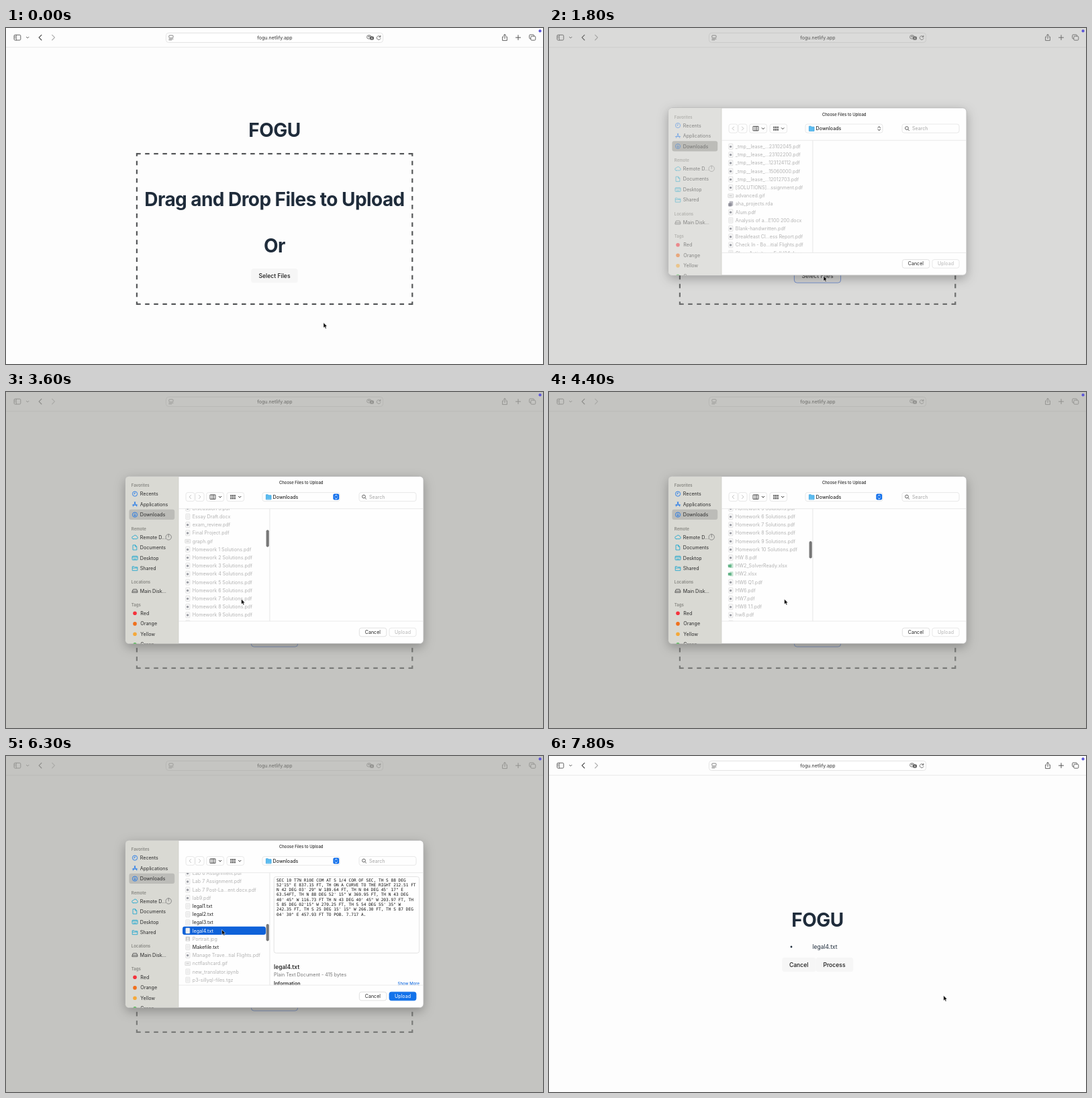
Animation of 800x500 px, one loop 8 s. Source, as an HTML page:

```html
<!DOCTYPE html>
<html lang="en">
<head>
<meta charset="utf-8">
<title>File upload</title>
<style>
html, body { margin: 0; width: 100%; height: 100%; overflow: hidden; background: #fdfdfd; }
svg { display: block; width: 800px; height: 500px; font-family: Inter, "Open Sans", sans-serif; }
.mono { font-family: "DejaVu Sans Mono", monospace; white-space: pre; }
.line { fill: none; stroke-linecap: round; stroke-linejoin: round; }
.butt { stroke-linecap: butt; }
</style>
</head>
<body>
<svg id="stage" viewBox="0 0 800 500"></svg>
<script>
const LOOP = 8000, STEP = 100, ROW = 12.2, FIRST_ROW = 183;
const INK = '#1f2c3b', BLUE = '#0f6fec', CYAN = '#25a9cf';

const text = (x, cy, str, { size = 7.1, fill = '#2b2b2b', weight = 400, anchor = 'start', extra = '' } = {}) =>
  `<text x="${x}" y="${cy + size * 0.36}" font-size="${size}" fill="${fill}" font-weight="${weight}" text-anchor="${anchor}" ${extra}>${str}</text>`;
const rect = (x, y, w, h, r = 0, fill = 'none', stroke = 'none', extra = '') =>
  `<rect x="${x}" y="${y}" width="${w}" height="${h}" rx="${r}" fill="${fill}" stroke="${stroke}" ${extra}/>`;
const path = (d, stroke = '#555', width = 0.9, extra = '') =>
  `<path class="line" d="${d}" stroke="${stroke}" stroke-width="${width}" ${extra}/>`;
const circle = (x, y, r, fill = 'none', stroke = 'none', width = 0.8) =>
  `<circle cx="${x}" cy="${y}" r="${r}" fill="${fill}" stroke="${stroke}" stroke-width="${width}"/>`;
const chevron = (x, y, dx, dy, stroke, width = 0.9) => dx
  ? path(`M${x - dx / 2} ${y - dy}L${x + dx / 2} ${y}L${x - dx / 2} ${y + dy}`, stroke, width)
  : path(`M${x - 1.8} ${y - dy / 2}L${x} ${y + dy / 2}L${x + 1.8} ${y - dy / 2}`, stroke, width);
const heading = (cy, str) =>
  text(400, cy, str, { size: 28, fill: INK, weight: 700, anchor: 'middle', extra: 'letter-spacing="-.56"' });
const centered = { anchor: 'middle' };

function toolbar() {
  return rect(0, 0, 800, 29, 0, '#fdfdfd') + rect(0, 28.4, 800, 0.8, 0, '#e3e3e3')
    + rect(238.4, 7.4, 323.2, 14.2, 4, '#fff', '#dedede', 'stroke-width=".8"')
    + text(400.5, 14.6, 'fogu.netlify.app', { ...centered, fill: '#333' })
    + '<g id="tools">'
    + rect(12, 10.3, 9.8, 7.8, 1.6, 'none', '#555', 'stroke-width=".9"') + path('M15.4 10.4V18M13.2 12.2h.9M13.2 13.7h.9M13.2 15.2h.9', '#555', 0.7)
    + chevron(32.2, 14.2, 0, 1.8, '#555', 0.9)
    + chevron(51, 14.2, -3.8, 3.8, '#444', 1.1) + chevron(70.6, 14.2, 3.8, 3.8, '#aaa', 1.1)
    + rect(242.8, 11, 6.2, 3.8, 0.9, 'none', '#666', 'stroke-width=".8"') + path('M242.8 16.4h6.2M242.8 18h4', '#666', 0.7)
    + rect(537.8, 10.8, 6, 5.2, 2, '#fff', '#555', 'stroke-width=".8"') + rect(542, 12.4, 6, 5.4, 1.8, '#555')
    + path('M539.5 12.5h2.6M540.8 11.8v2.6', '#555', 0.6) + path('M544 16.4l1-2.4l1 2.4', '#fff', 0.6)
    + path('M557.8 13.2A2.9 2.9 0 1 0 558 15.6M557.9 11.2V13.4H555.8', '#555', 0.8)
    + path('M741 13.1H739.6V18.6H746.4V13.1H745M743 15.7V9.6M741 11.4L743 9.5L745 11.4', '#555', 0.9)
    + path('M763 10.7V17.7M759.5 14.2H766.5', '#555', 1)
    + rect(779.6, 10, 7, 6, 1.4, 'none', '#555', 'stroke-width=".9"') + rect(781.8, 12.2, 7, 6, 1.4, '#fdfdfd', '#555', 'stroke-width=".9"')
    + '</g>';
}

// Solid corners, with dashes balanced around the middle of each side.
function dropZone(left, top, right, bottom) {
  const w = 2.18, dash = 3 * w, corner = 2 * w, h = w / 2;
  const midX = (left + right) / 2, midY = (top + bottom) / 2;
  let sides = '', corners = '';
  for (const y of [top + h, bottom - h])
    for (const x of [left + h, right - h]) {
      const sx = Math.sign(midX - x), sy = Math.sign(midY - y);
      sides += `M${midX} ${y}H${x + sx * (corner - h)}M${x} ${midY}V${y + sy * (corner - h)}`;
      corners += `M${x + sx * (corner - h)} ${y}H${x - sx * h}M${x} ${y + sy * (corner - h)}V${y - sy * h}`;
    }
  const color = '#555759';
  return `<path class="butt" fill="none" d="${sides}" stroke="${color}" stroke-width="${w}" stroke-dasharray="${dash}" stroke-dashoffset="${dash * 1.5}"/>`
    + `<path class="butt" fill="none" d="${corners}" stroke="${color}" stroke-width="${w}"/>`;
}

function uploadPage() {
  return '<g id="uploadPage">' + heading(152, 'FOGU') + dropZone(193.8, 186, 606.4, 412)
    + heading(255, 'Drag and Drop Files to Upload') + heading(323.8, 'Or')
    + rect(365.2, 358, 69.6, 21.2, 4, '#f6f6f6')
    + rect(365.4, 358.2, 69.2, 20.9, 4, 'none', '#3f74e6', 'id="ring" stroke-width=".8"')
    + text(400, 368.8, 'Select Files', { ...centered, size: 8.6, weight: 500, fill: '#1a1a1a' }) + '</g>';
}

function resultPage() {
  const label = { ...centered, size: 8.6, weight: 500, fill: '#1a1a1a' };
  return '<g id="resultPage">' + heading(243.6, 'FOGU') + circle(361, 284, 1.4, INK)
    + text(411, 284, 'legal4.txt', { ...centered, size: 8.5, fill: INK })
    + rect(347.3, 299.8, 50.4, 21.4, 4, '#f6f6f6') + rect(397.6, 299.8, 55.6, 21.4, 4, '#f6f6f6')
    + text(372.2, 310.6, 'Cancel', label) + text(425, 310.6, 'Process', label) + '</g>';
}

const glyphs = {
  clock: (y, c) => circle(192, y, 3.6, 'none', c) + path(`M192 ${y - 2}V${y}H190.6`, c, 0.8),
  apps: (y, c) => path(`M189.4 ${y + 3}L192.6 ${y - 3.4}M191.4 ${y - 3.4}L194.8 ${y + 3}M188.3 ${y + 1}H195.7`, c),
  down: (y, c) => circle(192, y, 3.6, 'none', c) + path(`M192 ${y - 1.8}V${y + 1.8}M190.5 ${y + .4}L192 ${y + 1.9}L193.5 ${y + .4}`, c, 0.8),
  cloud: (y, c) => path(`M189.4 ${y + 2.6}H194.8A1.9 1.9 0 0 0 195 ${y - 1}A2.8 2.8 0 0 0 189.8 ${y - 1.2}A1.9 1.9 0 0 0 189.4 ${y + 2.6}Z`, c),
  page: (y, c) => path(`M189.4 ${y - 3.6}H192.6L194.8 ${y - 1.4}V${y + 3.6}H189.4ZM192.5 ${y - 3.4}V${y - 1.3}H194.6`, c),
  desk: (y, c) => rect(188, y - 2.8, 8, 5.8, 1, 'none', c, 'stroke-width=".9"') + path(`M188.4 ${y - 1.2}H195.6M190 ${y + 1.6}H194`, c),
  folder: (y, c) => path(`M188.2 ${y + 2.8}V${y - 2.8}H191L192 ${y - 1.8}H195.8V${y + 2.8}ZM188.4 ${y - .5}H195.6`, c),
  disk: (y, c) => path(`M188.2 ${y + .4}L189.4 ${y - 2.4}H194.6L195.8 ${y + .4}V${y + 2.5}H188.2ZM188.4 ${y + .4}H195.6`, c),
  dot: (y, c) => circle(192, y, 2.8, c)
};

function sidebar() {
  const sections = [['Favorites', 139], ['Remote', 203.5], ['Locations', 283.2], ['Tags', 316.7]];
  const places = [
    ['Recents', 151.6, 'clock', BLUE], ['Applications', 167.1, 'apps', BLUE], ['Downloads', 182.6, 'down', BLUE],
    ['Remote D...', 216, 'cloud', CYAN], ['Documents', 231.4, 'page', CYAN], ['Desktop', 247, 'desk', CYAN],
    ['Shared', 262.5, 'folder', CYAN], ['Main Disk...', 296, 'disk', '#555'], ['Red', 329.3, 'dot', '#f5323c'],
    ['Orange', 344.9, 'dot', '#f0701c'], ['Yellow', 360.3, 'dot', '#f5a93a'], ['Green', 375.9, 'dot', '#45b649']
  ];
  return '<g id="side">' + sections.map(([s, y]) => text(186.8, y, s, { size: 6, weight: 600, fill: '#868681' })).join('')
    + places.map(([s, y, g, c]) => glyphs[g](y, c) + text(g === 'dot' ? 200.3 : 199.8, y, s)).join('')
    + circle(242.2, 215.9, 4.2, 'none', '#777', 0.8) + path('M242.2 211.7V215.9', '#777', 0.8) + '</g>';
}

const files = [
  '_tmp__lease_...23102045.pdf', '_tmp__lease_...23102200.pdf', '_tmp__lease_...123124112.pdf',
  '_tmp__lease_...15060000.pdf', '_tmp__lease_...12012703.pdf', '[SOLUTIONS]...ssignment.pdf',
  'advanced.gif', 'aha_projects.rda', 'Alum.pdf', 'Analysis of a...E100 200.docx', 'Blank-handwritten.pdf',
  'Breakfeast Cl...ess Report.pdf', 'Check In - Bo...itial Flights.pdf', "Class Activity...s Fall '24.docx",
  'classifier.cpp', 'data_cleaning.ipynb', 'Discussion 3.pdf', 'Essay Draft.docx', 'exam_review.pdf',
  'Final Project.pdf', 'graph.gif',
  ...[1, 2, 3, 4, 5, 6, 7, 8, 9, 10].map(n => `Homework ${n} Solutions.pdf`),
  'HW 8.pdf', 'HW2_SolverReady.xlsx', 'HW2.xlsx', 'HW6 Q1.pdf', 'HW6.pdf', 'HW7.pdf', 'HW8 1.1.pdf', 'hw8.pdf',
  'Lab 5 Assignment.pdf', 'Lab 6 Assignment.pdf', 'Lab 7 Assignment.pdf', 'Lab 7 Post-La...ent.docx.pdf', 'lab9.pdf',
  'legal1.txt', 'legal2.txt', 'legal3.txt', 'legal4.txt', 'Portrait.jpg', 'Makefile.txt',
  'Manage Trave...tial Flights.pdf', 'nctflashcard.gif', 'new_translator.ipynb', 'p3-sillyql-files.tgz', 'p4-starter-files.tgz'
];
const picked = files.indexOf('legal4.txt');
const rowY = i => FIRST_ROW + ROW * i;

function fileIcon(kind, y) {
  const sheet = rect(267.8, y - 4, 6, 8, 0.7, '#fafafa', '#d2d2d2', 'stroke-width=".6"');
  if (kind === 'pdf') return sheet + circle(270.6, y + 0.2, 1.7, '#9a9ca3');
  if (kind === 'gif') return rect(266.8, y - 2.6, 8, 5.4, 0.5, '#f4f4f4', '#c8c8c8', 'stroke-width=".6"') + rect(268.6, y - 0.6, 4, 1.2, 0, '#c8c8c8');
  if (kind === 'jpg') return rect(267.6, y - 3.4, 6.4, 6.8, 0.6, '#c9c9c9') + circle(270.8, y - 0.8, 1.3, '#eee') + rect(268.8, y + 1, 4, 2, 1, '#eee');
  if (kind === 'rda') return rect(268.6, y - 4, 5.6, 7, 1, '#b9b9c0') + rect(267.2, y - 1.4, 5, 5, 1, '#8f8f9a');
  if (kind === 'xlsx') return rect(269, y - 3.6, 5.4, 7, 0.6, '#c4e4d1') + rect(266.8, y - 2, 5, 4.2, 0.6, '#63b488');
  return sheet + path(`M269.2 ${y - 1.8}h3.2M269.2 ${y}h3.2M269.2 ${y + 1.8}h3.2`, '#d0d0d0', 0.5);
}

function fileList() {
  return '<g clip-path="url(#body)"><g id="rows">'
    + rect(263, rowY(picked) - 6.2, 124, 12.3, 3, BLUE, 'none', 'id="pickFill"')
    + files.map((name, i) => {
      const kind = name.split('.').pop();
      return fileIcon(kind, rowY(i)) + text(277.8, rowY(i), name,
        { fill: kind === 'txt' ? '#1c1c1c' : '#b2b2b2', extra: i === picked ? 'id="pickText"' : '' });
    }).join('') + '</g>' + rect(387.6, 177, 4.2, 25.4, 2.1, '#777', 'none', 'id="thumb"') + '</g>';
}

function preview() {
  const lines = [
    'SEC 10 T7N R10E COM AT S 1/4 COR OF SEC, TH S 88 DEG',
    '52\'15" E 837.15 FT, TH ON A CURVE TO THE RIGHT 212.51 FT',
    'N 42 DEG 03\' 29" W 189.64 FT, TH N 04 DEG 45\' 17" E',
    '63.54FT, TH N 88 DEG 52\' 15" W 369.95 FT, TH N 43 DEG',
    '40\' 45" W 116.73 FT TH N 43 DEG 40\' 45" W 203.97 FT, TH',
    'S 85 DEG 02\'15" W 270.25 FT, TH S 54 DEG 55\' 35" W',
    '242.35 FT, TH S 25 DEG 15\' 15" W 266.30 FT, TH S 87 DEG',
    '04\' 30" E 457.93 FT TO POB. 7.717 A.'
  ];
  return '<g id="preview" clip-path="url(#body)">' + rect(399.2, 179.6, 216.4, 113.6, 3, 'none', '#dcdcdc', 'stroke-width=".8"')
    + lines.map((s, i) => text(403, 184.4 + 7.27 * i, s, { size: 6.17, fill: '#111', extra: 'class="mono"' })).join('')
    + text(399, 314, 'legal4.txt', { size: 8.4, weight: 600 })
    + text(399, 325.5, 'Plain Text Document - 415 bytes', { fill: '#777' })
    + text(399, 338.6, 'Information', { weight: 600 })
    + text(616, 338.8, 'Show More', { size: 6, weight: 500, fill: '#1a6fe0', anchor: 'end' }) + '</g>';
}

function backing() {
  return '<g id="backing">' + rect(178, 125.5, 444, 249, 5.5, '#fefefe', '#a9a9a9', 'stroke-width=".7" filter="url(#shadow)"')
    + '<g clip-path="url(#round)">' + rect(178, 125.5, 79, 249, 0, '#d9d9d3', 'none', 'id="sideFill"')
    + rect(256.6, 125.5, 0.8, 249, 0, '#cfcfca') + rect(183.4, 174.8, 67.8, 15.2, 3, '#bcbcb8') + '</g></g>';
}

function sheet() {
  const control = (x, w) => rect(x, 149.6, w, 13, 3, 'none', '#e2e2e2', 'stroke-width=".8"');
  const columns = path('M304.4 153h7.6v6.4h-7.6zM307 153v6.4M309.5 153v6.4', '#444', 0.9);
  let grid = '';
  for (let i = 0; i < 6; i++) grid += rect(334.2 + (i % 3) * 2.8, 153 + (i > 2 ? 3.6 : 0), 2.1, 2.8, 0.4, '#666');
  return '<g id="sheet">' + backing() + '<g id="contents" clip-path="url(#round)">' + sidebar()
    + text(439.7, 135.2, 'Choose Files to Upload', { ...centered, size: 5.95, weight: 500 })
    + control(268, 13) + control(282, 13) + chevron(274.3, 156.1, -2.4, 2.5, '#bbb') + chevron(288.7, 156.1, 2.4, 2.5, '#bbb')
    + control(298.6, 26) + columns + chevron(319, 156.2, 0, 1.8, '#333', 1)
    + control(329, 25.6) + grid + chevron(348.2, 156.2, 0, 1.8, '#333', 1)
    + control(382, 115) + path('M387.4 159.6V152.8H390.4L391.4 153.8H395V159.6Z', '#3ba4e0', 0.8, 'style="fill:#5bbcf0"')
    + text(397.6, 156.1, 'Downloads', { weight: 500 })
    + rect(487.4, 151.6, 8.8, 9, 2, BLUE, 'none', 'id="stepFill"')
    + '<path id="stepper" class="line" stroke-width="1" d="M490 155L491.8 153.3L493.6 155M490 157.4L491.8 159.1L493.6 157.4"/>'
    + control(526, 85) + circle(533, 155.6, 2.4, 'none', '#555', 0.9) + path('M534.8 157.5L536.6 159.3', '#555')
    + text(541, 156.2, 'Search', { fill: '#a6a6a6' })
    + rect(257, 173.4, 365, 0.7, 0, '#e2e2e2') + fileList()
    + rect(392.6, 174, 0.7, 167, 0, '#dedede') + preview()
    + rect(257, 340.7, 365, 0.7, 0, '#e2e2e2')
    + rect(526.4, 351.2, 40.4, 12.6, 3, '#fff', '#dadada', 'stroke-width=".8"') + text(546.4, 357.5, 'Cancel', { ...centered, fill: '#222' })
    + rect(571, 351.2, 40, 12.6, 3, '#fff', '#e3e3e3', 'id="uploadFill" stroke-width=".8"')
    + text(591, 357.5, 'Upload', { ...centered, extra: 'id="uploadText"' }) + '</g></g>';
}

const stage = document.getElementById('stage');
stage.innerHTML = `<defs>
  <clipPath id="body">${rect(257, 174, 365, 166.8)}</clipPath>
  <clipPath id="round">${rect(178, 125.5, 444, 249, 5.5)}</clipPath>
  <filter id="shadow" x="-20%" y="-20%" width="140%" height="150%"><feDropShadow dx="0" dy="5" stdDeviation="8" flood-opacity=".28"/></filter>
  </defs>` + rect(0, 0, 800, 500, 0, '#fdfdfd') + toolbar() + uploadPage() + resultPage()
  + rect(0, 0, 800, 500, 0, '#989893', 'none', 'id="dim"') + sheet() + circle(795.6, 4.4, 2.1, '#5c56d8')
  + '<path id="cursor" d="M0 0V7.6L1.7 6L3 8.8L4.3 8.2L3.1 5.5H5.4Z" fill="#000" stroke="#fff" stroke-width=".5" stroke-linejoin="round"/>';

const el = Object.fromEntries([...stage.querySelectorAll('[id]')].map(n => [n.id, n]));
const set = (id, attrs) => { for (const k in attrs) el[id].setAttribute(k, attrs[k]); };
const show = (id, on) => set(id, { visibility: on ? 'visible' : 'hidden' });

// Tables of [time, value...]
const cursorTrack = [[100, 473, 438.6], [900, 409, 369], [1900, 409, 369], [2500, 350.6, 308.2], [5400, 350.6, 308.2],
  [6000, 321.6, 258.4], [6300, 321.6, 258.4], [6700, 587.8, 356.4]];
const scrollTrack = [[2500, 0], [2700, 21], [3100, 110], [3600, 205], [4400, 314.7], [4800, 390], [4900, 390], [5300, 496.4]];
const sheetTrack = [[1600, 0, 0, -12], [1700, 0.15, 0.5, -9], [1800, 0.345, 1, -6.6], [1900, 0.56, 1, 0],
  [7300, 0.56, 1, 0], [7400, 0.5, 0.95, -1.5], [7500, 0.345, 0.55, -6.2], [7600, 0.12, 0.1, -10], [7700, 0, 0, -12]];
const smooth = p => p * p * (3 - 2 * p);

function sample(track, t, ease = p => p) {
  const next = track.findIndex(k => k[0] > t);
  if (next === 0) return track[0].slice(1);
  if (next < 0) return track[track.length - 1].slice(1);
  const a = track[next - 1], b = track[next], p = ease((t - a[0]) / (b[0] - a[0]));
  return a.slice(1).map((v, i) => v + (b[i + 1] - v) * p);
}

function draw(t) {
  const [x, y] = sample(cursorTrack, t, smooth);
  const [scroll] = sample(scrollTrack, t);
  const [dim, alpha, lift] = sample(sheetTrack, t);
  const active = t >= 1900 && t < 7500, selected = t >= 6100;
  const ready = selected && active;

  set('cursor', { transform: `translate(${x} ${y})` });
  set('dim', { opacity: dim });
  set('sheet', { transform: `translate(0 ${lift})` });
  set('backing', { opacity: alpha });
  set('contents', { opacity: Math.sqrt(alpha) });
  set('tools', { opacity: active ? 0.7 : 1 });
  show('uploadPage', t < 7700);
  show('resultPage', t >= 7700);
  show('ring', t >= 700 && t < 7700);

  set('side', { opacity: active ? 1 : 0.5 });
  set('sideFill', { fill: active ? '#d9d9d3' : '#e0e0dd' });
  set('stepper', { stroke: active ? '#fff' : '#333' });
  show('stepFill', active);

  set('rows', { transform: `translate(0 ${-scroll})` });
  set('thumb', { y: 173.8 + 0.1535 * scroll });
  show('thumb', t >= 2600 && t < 6900);
  show('pickFill', selected && t < 7700);
  set('pickFill', { fill: active ? '#0f62d9' : '#d2d2d2' });
  set('pickText', { fill: ready ? '#fff' : '#1c1c1c' });
  show('preview', selected && t < 7700);
  set('uploadFill', { fill: ready ? '#1272ea' : '#fff', stroke: ready ? '#1272ea' : '#e3e3e3' });
  set('uploadText', { fill: ready ? '#fff' : selected ? '#222' : '#b5b5b5' });
}

const start = performance.now();
function tick() {
  const t = (performance.now() - start) % LOOP;
  draw(Math.floor(t / STEP) * STEP);
  requestAnimationFrame(tick);
}
tick();
</script>
</body>
</html>
```
